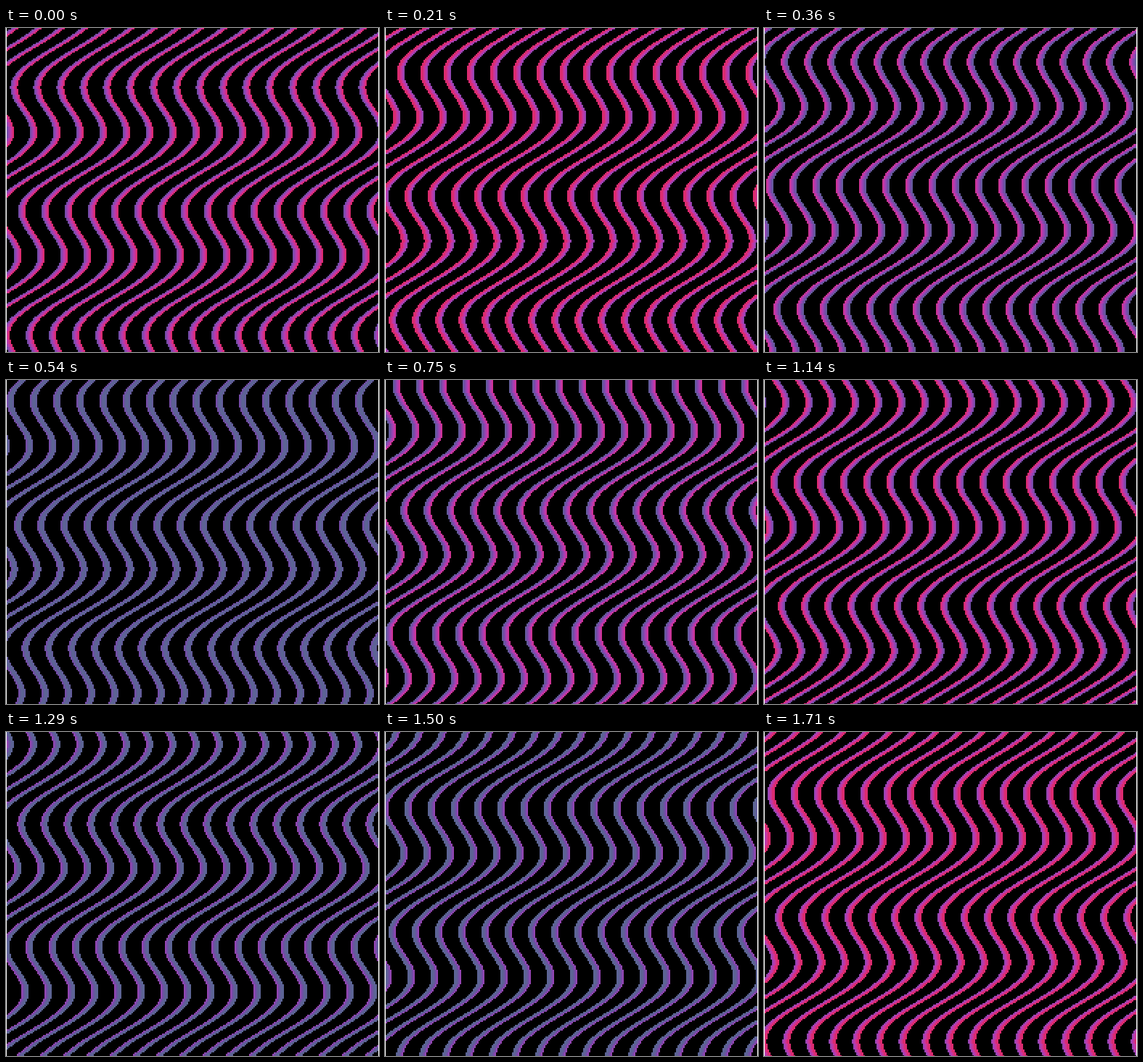
These frames come from a looping animation (514 px wide and 447 px high, 1740 ms). An HTML page with a canvas:

```html
<!DOCTYPE html>
<html lang="en">
<head>
<meta charset="utf-8">
<title>Waves</title>
<style>
html, body { margin: 0; width: 100%; height: 100%; overflow: hidden; background: #fff; }
canvas { position: absolute; left: 1px; top: 0; width: 512px; height: 448px; image-rendering: pixelated; }
</style>
</head>
<body>
<canvas id="stage" width="256" height="224"></canvas>
<script>
const W = 256, H = 224;
const STEP = 30, STEPS = 58;     // ms per step, steps per loop
const GAP = 16, HALF = 2;        // stripe spacing and half width
const COLORS = 14, PEAK = 2.5;   // ring of colours and its reddest place
const ramp = [
  [92, 100, 148], [108, 78, 165], [145, 70, 178],
  [185, 58, 175], [210, 48, 140], [226, 40, 90]
];

const ctx = document.getElementById('stage').getContext('2d');
const img = ctx.createImageData(W, H);
const px = new Uint32Array(img.data.buffer);
const mod = (a, n) => ((a % n) + n) % n;
const rgb = (r, g, b) => (255 << 24 | b << 16 | g << 8 | r) >>> 0;
const BLACK = rgb(0, 0, 0);

// Slate far from the peak, rising evenly to red on both sides of it.
function shade(place) {
  const away = Math.abs(mod(place - PEAK + COLORS / 2, COLORS) - COLORS / 2);
  const s = Math.max(0, 1 - away / 6) * (ramp.length - 1);
  const i = Math.min(Math.floor(s), ramp.length - 2);
  const c = ramp[i].map((v, n) => Math.round(v + (ramp[i + 1][n] - v) * (s - i)));
  return rgb(...c);
}

function draw(k) {
  const turn = Math.floor((k + 1) / 2);
  const stripe = new Uint32Array(GAP).fill(BLACK);
  for (let c = -HALF; c <= HALF; c++) stripe[c + HALF] = shade(turn + c);

  for (let y = 0; y < H; y++) {
    const angle = 2 * Math.PI * (3 * (y - 56) / 256 + k / STEPS);
    const mid = Math.round(7.25 - y / 2 + 16 * Math.sin(angle));
    for (let x = 0; x < W; x++) px[y * W + x] = stripe[mod(x - mid + HALF, GAP)];
  }
  ctx.putImageData(img, 0, 0);
}

const start = performance.now();
let last = -1;
function tick() {
  const k = Math.floor((performance.now() - start) / STEP) % STEPS;
  if (k !== last) draw(last = k);
  requestAnimationFrame(tick);
}
tick();
</script>
</body>
</html>
```
